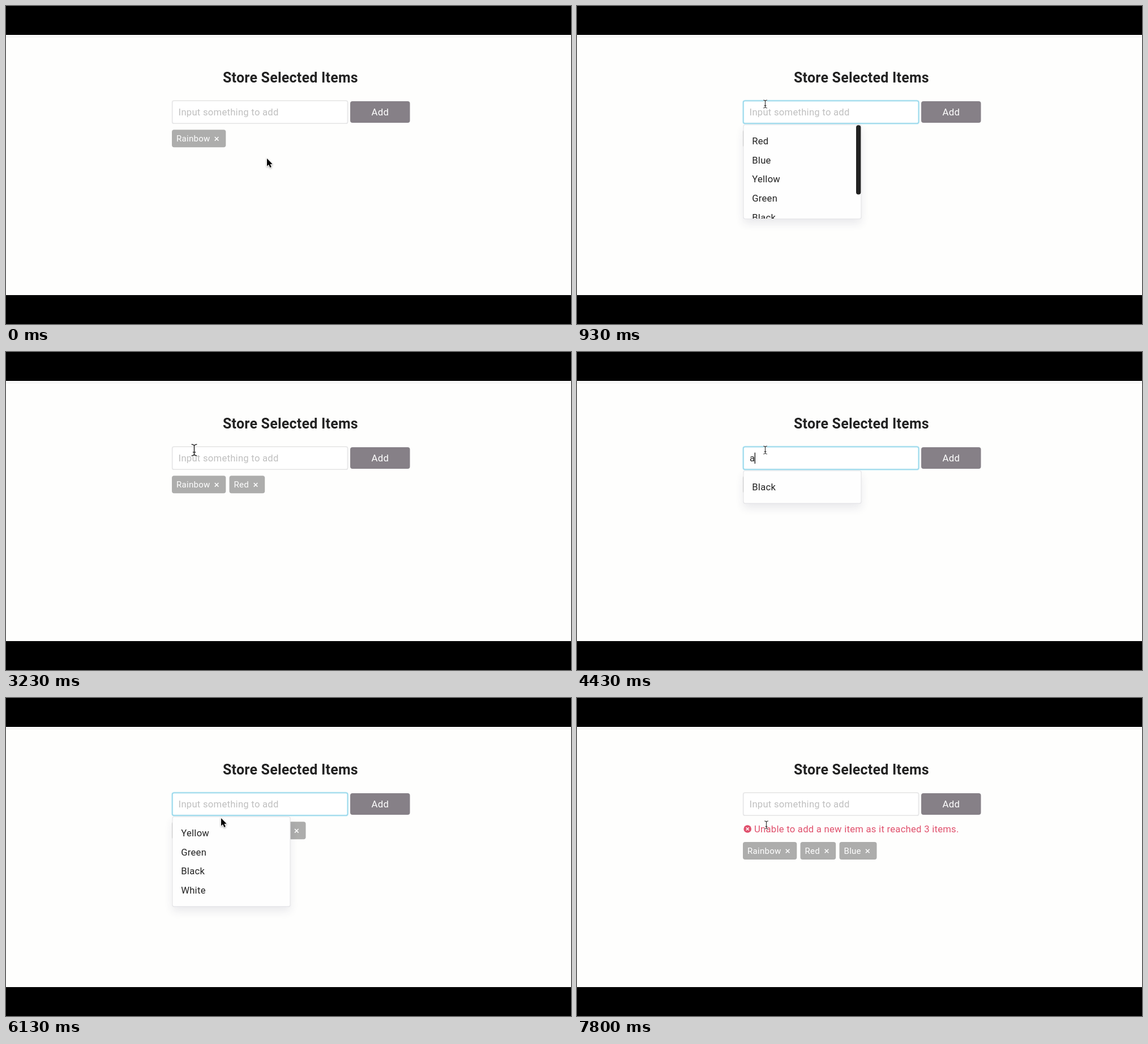
Animation, 998 px wide and 561 px high, one loop 8000 ms. Source, as an HTML page with a canvas:

```html
<!DOCTYPE html>
<html lang="en">
<head>
<meta charset="utf-8">
<title>Store Selected Items</title>
<style>
  html, body { margin: 0; width: 100%; height: 100%; overflow: hidden; background: #000; }
  canvas { display: block; width: 998px; height: 561px; }
</style>
</head>
<body>
<canvas id="stage" width="998" height="561"></canvas>
<script>
const ctx = document.getElementById('stage').getContext('2d');
const LOOP = 8000;
const COLORS = ['Red', 'Blue', 'Yellow', 'Green', 'Black', 'White'];
const ROW = 33.6;

// Each visit to the field: focus, one typed letter, submit; blinks flip the caret.
const visits = [
  { focus: 650, type: 1430, letter: 'r', submit: 2400, taken: 0, blinks: [930, 1200, 1830, 2060, 2330] },
  { focus: 3300, type: 3900, letter: 'a', submit: 4960, taken: 1, blinks: [3730, 3900, 4200, 4430, 4700] },
  { focus: 5810, type: 6860, letter: 'y', submit: 7330, taken: 2, blinks: [6130, 6400, 6630, 6860, 7260] }
];
const caretX = { r: 311.5, a: 314.3, y: 314 };

const tags = [
  { name: 'Rainbow', x: 293, w: 95.3, from: 0 },
  { name: 'Red', x: 394.5, w: 62.7, from: 2400 },
  { name: 'Blue', x: 463.5, w: 66, from: 4960 }
];

// Pointer path: time, x, y
const path = [
  [100, 461, 269], [420, 282, 204], [640, 332.5, 173], [4430, 332.5, 173],
  [4680, 380, 216], [4930, 380, 216], [5500, 380, 214], [5700, 380, 212],
  [6330, 380, 212], [6400, 381, 212], [6460, 380, 212], [7520, 380, 212], [7790, 334.5, 224]
];
const hidden = [[1430, 1830], [2400, 3060], [3900, 4430], [4990, 5500]];
const pops = [3060, 5500];

const clamp = v => Math.max(0, Math.min(1, v));
const ease = v => v * v * (3 - 2 * v);

function text(str, x, y, size, color, weight = 400) {
  ctx.font = `${weight} ${size}px Roboto, Arial, sans-serif`;
  ctx.letterSpacing = '0.28px';
  ctx.fillStyle = color;
  ctx.fillText(str, x, y);
}

function box(x, y, w, h, r, fill, stroke, line) {
  ctx.beginPath();
  ctx.roundRect(x, y, w, h, r);
  if (fill) { ctx.fillStyle = fill; ctx.fill(); }
  if (stroke) { ctx.strokeStyle = stroke; ctx.lineWidth = line; ctx.stroke(); }
}

function cross(x, y, r, width) {
  ctx.beginPath();
  ctx.moveTo(x - r, y - r); ctx.lineTo(x + r, y + r);
  ctx.moveTo(x + r, y - r); ctx.lineTo(x - r, y + r);
  ctx.strokeStyle = '#fff';
  ctx.lineWidth = width;
  ctx.stroke();
}

function page() {
  ctx.fillStyle = '#000';
  ctx.fillRect(0, 0, 998, 561);
  ctx.fillStyle = '#fefefd';
  ctx.fillRect(0, 51, 998, 459);
  ctx.fillStyle = '#ebebec';
  ctx.fillRect(0, 54, 998, 1);
  text('Store Selected Items', 383, 135, 24.9, '#222', 700);
  box(608, 168, 105.5, 38, 4, '#868087');
  text('Add', 645.5, 193, 16.8, '#fff');
}

function field(value, focus) {
  box(293.7, 167.2, 309.8, 40, 3, '#fff', '#e7e7e8', 1.8);
  if (focus > 0) {
    ctx.globalAlpha = focus;
    box(293.5, 167, 310.2, 40.4, 3.5, null, '#dff4fa', 3.6);
    box(293.7, 167.2, 309.8, 40, 3, null, '#93d6ea', 1.5);
    ctx.globalAlpha = 1;
  }
  if (value) text(value, 305, 193, 16.6, '#222');
  else text('Input something to add', 304.6, 193, 16.6, '#bfbfbf');
}

function tagRow(t, y) {
  for (const { name, x, w, from } of tags) {
    if (t < from) continue;
    box(x, y, w, 31, 4, '#adadac');
    text(name, x + 8, y + 20.8, 15, '#fff');
    cross(x + w - 16.2, y + 16, 3.3, 1.5);
  }
}

function errorLine() {
  ctx.fillStyle = '#e0506c';
  ctx.beginPath();
  ctx.arc(301.2, 231, 6.8, 0, 7);
  ctx.fill();
  cross(301.2, 231, 2.5, 1.5);
  text('Unable to add a new item as it reached 3 items.', 313, 236.8, 16.6, '#e0506c');
}

function dropdown(items, alpha) {
  const content = items.length * ROW + 24;
  const h = Math.min(content, 166);
  ctx.save();
  ctx.globalAlpha = alpha;
  ctx.save();
  ctx.shadowColor = 'rgba(50,50,90,0.10)';
  ctx.shadowBlur = 15;
  ctx.shadowOffsetY = 8;
  box(294, 209.5, 208, h, 3, '#fefefe');
  ctx.restore();
  box(294, 209.5, 208, h, 3, '#fefefe', '#e4e4e7', 1.2);
  ctx.beginPath();
  ctx.rect(294, 210, 208, h - 1);
  ctx.clip();
  items.forEach((name, i) => text(name, 309.2, 244.2 + i * ROW, 16.6, '#222'));
  if (content > h) box(493, 210.3, 8.3, h * h / content, 4, '#222');
  ctx.restore();
}

function arrow() {
  ctx.beginPath();
  [[0, 0], [0, 13.6], [3.1, 10.8], [5.4, 16], [7.8, 15], [5.5, 10], [9.6, 9.8]]
    .forEach(([x, y]) => ctx.lineTo(x, y));
  ctx.closePath();
  ctx.save();
  ctx.shadowColor = 'rgba(0,0,0,0.4)';
  ctx.shadowBlur = 3;
  ctx.shadowOffsetY = 1;
  ctx.strokeStyle = '#fff';
  ctx.lineWidth = 1.5;
  ctx.stroke();
  ctx.restore();
  ctx.fillStyle = '#000';
  ctx.fill();
}

function ibeam() {
  ctx.beginPath();
  for (const s of [-1, 1]) {
    ctx.moveTo(-3.4, 7 * s);
    ctx.quadraticCurveTo(-0.3, 7 * s, 0, 5 * s);
    ctx.quadraticCurveTo(0.3, 7 * s, 3.4, 7 * s);
  }
  ctx.moveTo(0, -5.5); ctx.lineTo(0, 5.5);
  ctx.moveTo(-1.8, 2.6); ctx.lineTo(1.8, 2.6);
  for (const [color, width] of [['rgba(255,255,255,0.7)', 2.4], ['#333', 1.15]]) {
    ctx.strokeStyle = color;
    ctx.lineWidth = width;
    ctx.stroke();
  }
}

function pointerAt(t) {
  const next = path.findIndex(p => p[0] > t);
  if (next === 0) return path[0].slice(1);
  if (next < 0) return path[path.length - 1].slice(1);
  const [t0, x0, y0] = path[next - 1], [t1, x1, y1] = path[next];
  const k = ease((t - t0) / (t1 - t0));
  return [x0 + (x1 - x0) * k, y0 + (y1 - y0) * k];
}

function pointer(t) {
  if (hidden.some(([a, b]) => t >= a && t < b)) return;
  const [x, y] = pointerAt(t);
  let scale = 1;
  for (const p of pops) {
    if (t >= p) scale = 1 + 1.55 * (1 - ease(clamp((t - p - 60) / 170)));
  }
  const overText = (x > 294 && x < 603 && y > 167 && y < 208) || t > 7680;
  ctx.save();
  ctx.translate(x, y);
  ctx.scale(scale, scale);
  overText ? ibeam() : arrow();
  ctx.restore();
}

function draw(t) {
  const visit = visits.find(v => t >= v.focus && t < v.submit + 200);
  const active = visit && t < visit.submit;
  const typed = active && t >= visit.type;
  const failed = t >= visits[2].submit;
  const fade = visit ? Math.min(clamp((t - visit.focus) / 150), clamp((visit.submit + 200 - t) / 200)) : 0;

  page();
  field(typed ? visit.letter : '', fade);
  if (failed) errorLine();
  tagRow(t, failed ? 254 : 218.3);
  if (active && visit.blinks.filter(b => t >= b).length % 2 === 0) {
    ctx.fillStyle = '#111';
    ctx.fillRect(typed ? caretX[visit.letter] - 0.6 : 305.4, 177.5, 1.3, 19.5);
  }
  if (visit) {
    const left = COLORS.slice(visit.taken);
    const filtered = t >= visit.type + 30;
    dropdown(filtered ? left.filter(c => c.toLowerCase().includes(visit.letter)) : left, fade);
  }
  pointer(t);
}

const start = performance.now();
function tick() {
  draw((performance.now() - start) % LOOP);
  requestAnimationFrame(tick);
}
tick();
</script>
</body>
</html>
```
